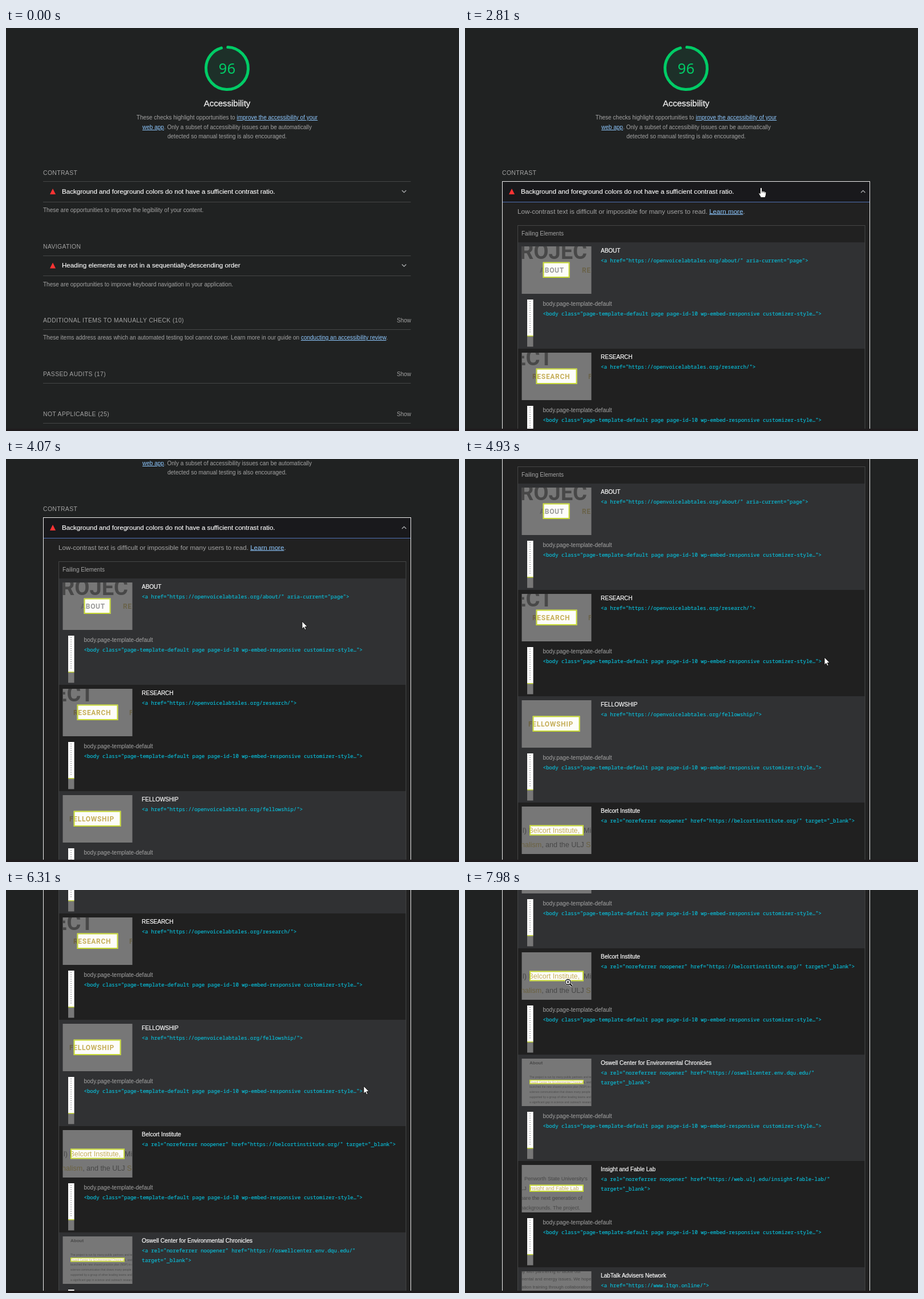
Animation of 794 by 705 pixels, one loop 8 s. Source, as an HTML page:

```html
<!DOCTYPE html>
<html lang="en">
<head>
<meta charset="utf-8">
<title>Accessibility report</title>
<style>
  html, body { margin: 0; width: 100%; height: 100%; overflow: hidden; background: #202222; }
  #stage { display: block; width: 794px; height: 705px; }
  text { font: 10px "Liberation Sans", Arial, sans-serif; fill: #a4a4a4; }
  .mid { text-anchor: middle; }
  .end { text-anchor: end; }
  .title { font-size: 15px; fill: #eee; stroke: #eee; stroke-width: .3px; }
  .group { font-size: 10.4px; letter-spacing: .38px; }
  .audit { font-size: 11.6px; fill: #fff; stroke: #fff; stroke-width: .15px; }
  .intro { font-size: 11.6px; }
  .node { fill: #fff; stroke: #fff; stroke-width: .2px; }
  .code { font: 9.05px "Noto Sans Mono", monospace; fill: #08c0dc; stroke: #08c0dc; stroke-width: .15px; }
  .score { font: 25px "Noto Sans Mono", monospace; fill: #0c6; text-anchor: middle; }
  .link { fill: #8ec8ff; text-decoration: underline; }
  .rule { stroke: #454646; }
  .chevron { fill: none; stroke: #b4b6b8; stroke-width: 1.2; }
  .hero { font: 700 38px Roboto, sans-serif; fill: #484848; }
  .menu { font: 700 12px Roboto, sans-serif; letter-spacing: .7px; }
  .large { font-size: 12.5px; }
  .medium { font-size: 9.1px; }
  .small { font-size: 7.8px; }
  .tiny { font-size: 5px; }
</style>
</head>
<body>
<svg id="stage" viewBox="0 0 794 705"></svg>
<script>
const LOOP = 8000, OPEN_AT = 2810, ROW_TOP = 375, ROW_HEIGHT = 186;

const escapeText = s => s.replace(/&/g, '&amp;').replace(/</g, '&lt;');
const raw = (x, y, cls, markup, style = '') =>
  `<text x="${x}" y="${y}" class="${cls}" style="${style}">${markup}</text>`;
const text = (x, y, cls, s, fill) => raw(x, y, cls, escapeText(s), fill ? `fill:${fill}` : '');
const link = s => `<tspan class="link">${s}</tspan>`;
const rect = (x, y, w, h, fill, extra = '') =>
  `<rect x="${x}" y="${y}" width="${w}" height="${h}" fill="${fill}" ${extra}/>`;
const rule = y => `<path class="rule" d="M65 ${y}H709.5"/>`;
const clip = (x, y, w, h, inner) =>
  `<svg x="${x}" y="${y}" width="${w}" height="${h}" viewBox="${x} ${y} ${w} ${h}">${inner}</svg>`;
const chevron = (y, up) =>
  `<path class="chevron" d="${up ? `M694 ${y + 2}l3.7-3.7 3.7 3.7` : `M694 ${y - 2}l3.7 3.7 3.7-3.7`}"/>`;
const audit = (y, title, up) =>
  `<path d="M82 ${y - 5}l5 10h-10z" fill="#f33"/>` + text(98, y + 3.5, 'audit', title) + chevron(y, up);

// Dimmed text with a lit, outlined box that shows the same text in another colour.
function lit(x, y, cls, s, [bx, by, bw, bh], dark, light, line = 2) {
  return text(x, y, cls, s, dark) +
    clip(bx, by, bw, bh, rect(bx, by, bw, bh, '#fdfdfa') + text(x, y, cls, s, light)) +
    rect(bx + line / 2, by + line / 2, bw - line, bh - line, 'none', `stroke="#c6d834" stroke-width="${line}"`);
}

const GOLD = '#c6af5a', DIM_GOLD = '#6b613f', INK = '#474747';
const site = 'https://openvoicelabtales.org/';
const newTab = '<a rel="noreferrer noopener" href=';

const rows = [
  ['ABOUT', [`<a href="${site}about/" aria-current="page">`],
    text(96, 29, 'hero', 'ROJECT') + text(205, 53, 'menu', 'RESEARCH', '#6a634a') +
    lit(131, 53, 'menu', 'ABOUT', [136.5, 34.5, 47, 27.5], '#636363', '#999')],
  ['RESEARCH', [`<a href="${site}research/">`],
    text(85, 29, 'hero', 'ECT') + text(216, 53, 'menu', 'F', '#6a634a') +
    lit(118, 53, 'menu', 'RESEARCH', [124.5, 34.5, 72, 27.5], DIM_GOLD, GOLD)],
  ['FELLOWSHIP', [`<a href="${site}fellowship/">`],
    lit(111, 53, 'menu', 'FELLOWSHIP', [118.5, 34.5, 83, 27.5], DIM_GOLD, GOLD)],
  ['Belcort Institute', [newTab + '"https://belcortinstitute.org/" target="_blank">'],
    text(208, 53, 'large', 'Mi', INK) +
    lit(101, 53, 'large', 'l) Belcort Institute,', [113, 39.5, 95, 18], INK, GOLD) +
    raw(98, 78, 'large', `<tspan fill="${DIM_GOLD}">nalism</tspan>, and the ULJ <tspan fill="${DIM_GOLD}">S</tspan>`, `fill:${INK}`)],
  ['Oswell Center for Environmental Chronicles',
    [newTab + '"https://oswellcenter.env.dqu.edu/"', 'target="_blank">'],
    raw(113, 16.5, '', 'About', `font-weight:700;font-size:8px;fill:${INK}`) +
    ['The project is run by many public partners and teams',
     '',
     'launched the new shared practice plan (NSP) in order',
     'science communication that draws many people and',
     'supported by a group of other leading teams and',
     'a significant gap in science and outreach research'
    ].map((s, i) => text(113, 41 + i * 8.7, 'tiny', s, '#4c4c4c')).join('') +
    lit(113, 49.5, 'tiny', 'Oswell Center for Environmental Chronicles, and the', [113, 44, 95, 7.5], '#4c4c4c', GOLD, 1.5)],
  ['Insight and Fable Lab',
    [newTab + '"https://web.ulj.edu/insight-fable-lab/"', 'target="_blank">'],
    text(104, 34, 'medium', "Penworth State University's", INK) +
    text(98, 51, 'medium', 'LJ', INK) +
    lit(112, 51, 'medium', 'Insight and Fable Lab', [113, 41.5, 95, 12.5], DIM_GOLD, GOLD) +
    text(97, 68, 'medium', 'pare the next generation of', INK) +
    text(97, 85, 'medium', 'backgrounds.  The project.', INK)],
  ['LabTalk Advisers Network', ['<a href="https://www.ltqn.online/">'],
    text(97, 9.5, 'small', 'by with partnering to tackle our', INK) +
    text(97, 23, 'small', 'mental and energy issues. We hope', INK) +
    text(97, 36.5, 'small', 'ration training through collaborations', INK) +
    lit(113, 50, 'small', 'LabTalk Advisers Network', [113, 42, 95, 12], INK, GOLD)],
];

const bodyCode = '<body class="page-template-default page page-id-10 wp-embed-responsive customizer-style…">';

function row([name, code, thumb], i) {
  return `<g transform="translate(0 ${ROW_TOP + i * ROW_HEIGHT})">` +
    rect(93, 0, 608, ROW_HEIGHT, i % 2 ? '#202020' : '#303133') +
    clip(99.5, 7, 122, 83, rect(99, 7, 123, 83, '#777') + thumb) +
    text(238, 18, 'node', name) +
    code.map((s, n) => text(238, 35 + n * 16.7, 'code', s)).join('') +
    rect(109, 100, 10.5, 82.5, '#777') + rect(109, 100, 10.5, 63, '#fff') +
    rect(109, 163, 10.5, 1.5, '#c6d834') +
    '<path d="M114 103V160" stroke="#888" stroke-width="2" stroke-dasharray="1 2.8"/>' +
    text(136.5, 111, '', 'body.page-template-default') +
    text(136.5, 128, 'code', bodyCode) + '</g>';
}

const ring = 2 * Math.PI * 37;
const contrastTitle = 'Background and foreground colors do not have a sufficient contrast ratio.';

const head =
  '<circle cx="387.5" cy="70.5" r="37" fill="#1d3029"/>' +
  `<circle cx="387.5" cy="70.5" r="37" fill="none" stroke="#0c6" stroke-width="5" stroke-linecap="round"
    stroke-dasharray="${ring * .96 - 2.5} ${ring}" transform="rotate(-88 387.5 70.5)"/>` +
  text(387.5, 80, 'score', '96') +
  text(387.5, 137, 'title mid', 'Accessibility') +
  raw(387.5, 160, 'mid', 'These checks highlight opportunities to ' + link('improve the accessibility of your')) +
  raw(387.5, 177, 'mid', link('web app') + '. Only a subset of accessibility issues can be automatically') +
  text(387.5, 193, 'mid', 'detected so manual testing is also encouraged.') +
  text(65, 256.5, 'group', 'CONTRAST');

const section = (y, title) => text(65, y, 'group', title) + text(710, y, 'end', 'Show') + rule(y + 12.5);

const closed =
  rule(268.5) + audit(286, contrastTitle) + rule(304.5) +
  text(65, 322, '', 'These are opportunities to improve the legibility of your content.') +
  text(65, 385.5, 'group', 'NAVIGATION') + rule(398.5) +
  audit(415.5, 'Heading elements are not in a sequentially-descending order') + rule(433.5) +
  text(65, 452, '', 'These are opportunities to improve keyboard navigation in your application.') +
  section(515, 'ADDITIONAL ITEMS TO MANUALLY CHECK (10)') +
  raw(65, 545, '', 'These items address areas which an automated testing tool cannot cover. Learn more in our guide on ' +
    link('conducting an accessibility review') + '.') +
  section(609, 'PASSED AUDITS (17)') + section(679, 'NOT APPLICABLE (25)');

const opened =
  rect(65.5, 268.5, 644, 1500, '#212121', 'stroke="#eee"') +
  rect(66, 269, 643, 35, '#19191c') +
  '<path d="M66 304.5H709" stroke="#4f70b4"/>' +
  audit(286, contrastTitle, true) +
  raw(92, 324.5, 'intro', 'Low-contrast text is difficult or impossible for many users to read. ' + link('Learn more') + '.') +
  text(99, 363, '', 'Failing Elements') +
  rows.map(row).join('') +
  rect(92.5, 345.5, 608.5, 1400, 'none', 'class="rule"');

const pointers = {
  arrow: '<path transform="scale(.8)" d="M0 0V16.5L3.8 12.9 6.2 18.5 8.8 17.4 6.4 11.9H11.6Z" fill="#fff" stroke="#000"/>',
  hand: `<path d="M-1.5 1.2Q0-.6 1.5 1.2V6L6.5 7Q9 7.5 8.8 9.5L8.3 13.5Q7.5 15.5 7 17.5H-.5Q-1.5 15-3 13L-4.2 10.5Q-4 8.8-1.5 10.6Z"
    fill="#fff" stroke="#000" stroke-width=".8"/><path d="M1.5 6v3M4 6.5v3M6.5 7v3" stroke="#000" stroke-width=".7"/>`,
  zoom: `<path d="M3.3 3.3L7 7" stroke="#fff" stroke-width="4"/><circle r="5.7" fill="#fff"/>
    <path d="M3.3 3.3L7 7" stroke="#000" stroke-width="2.2"/>
    <circle r="4.5" fill="#fff" stroke="#000" stroke-width="1.3"/><path d="M-2.5 0h5M0-2.5v5" stroke="#000" stroke-width="1.2"/>`,
};

const stage = document.getElementById('stage');
stage.innerHTML = rect(0, 0, 794, 705, '#202222') +
  `<g id="page">${head}<g id="closed">${closed}</g><g id="opened">${opened}</g></g>` +
  rect(0, 701, 794, 4, '#1f1b1d') +
  `<g id="cursor">${Object.entries(pointers).map(([k, v]) => `<g id="${k}">${v}</g>`).join('')}</g>`;

// [time, scroll offset], held until the next step
const scrollSteps = [
  [0, 0], [3590, 30], [3660, 120], [3750, 166], [4220, 190], [4290, 290], [4360, 332],
  [5330, 350], [5400, 450], [5480, 498], [6250, 520], [6320, 620], [6390, 664],
  [7130, 667.5], [7220, 720], [7330, 810], [7440, 831],
];

// [time, x, y]
const cursorPath = [
  [670, 729, 152], [860, 620, 92], [1040, 500, 74], [1240, 380, 76], [1420, 303, 86],
  [1480, 282, 125], [1540, 278, 185], [1600, 325, 237], [1660, 325, 237], [1900, 400, 268],
  [2100, 480, 280], [2260, 519, 279], [3320, 519, 279], [3460, 519, 284], [4390, 519, 284],
  [4640, 746, 318], [4930, 630, 347], [5330, 630, 347], [5480, 628, 344], [5890, 628, 344],
  [5960, 627, 343], [6390, 627, 343], [6800, 56, 290], [7040, 149.5, 317.5], [7220, 149.5, 317.5],
  [7440, 162, 318], [7580, 162, 318], [7780, 188, 235], [7980, 180.5, 161],
];

function cursorAt(t) {
  const i = cursorPath.findIndex(p => p[0] > t);
  if (i < 0) return cursorPath.at(-1).slice(1);
  const [t0, x0, y0] = cursorPath[Math.max(i - 1, 0)], [t1, x1, y1] = cursorPath[i];
  const k = Math.max(0, (t - t0) / (t1 - t0 || 1));
  return [x0 + (x1 - x0) * k, y0 + (y1 - y0) * k];
}

const el = id => document.getElementById(id);
const show = (id, on) => el(id).setAttribute('display', on ? 'inline' : 'none');

function draw(t) {
  const scroll = scrollSteps.findLast(s => s[0] <= t)[1];
  const isOpen = t >= OPEN_AT;
  el('page').setAttribute('transform', `translate(0 ${-scroll})`);
  show('closed', !isOpen);
  show('opened', isOpen);

  const [x, y] = cursorAt(t);
  const inRow = (y + scroll - ROW_TOP) % ROW_HEIGHT;
  const overThumb = isOpen && x > 99 && x < 221 && inRow > 7 && inRow < 90;
  const kind = t >= 2390 && t < 4070 ? 'hand' : overThumb ? 'zoom' : 'arrow';
  show('cursor', t >= cursorPath[0][0]);
  el('cursor').setAttribute('transform', `translate(${x} ${y})`);
  for (const name in pointers) show(name, name === kind);
}

const start = performance.now();
function tick() {
  draw((performance.now() - start) % LOOP);
  requestAnimationFrame(tick);
}
tick();
</script>
</body>
</html>
```
